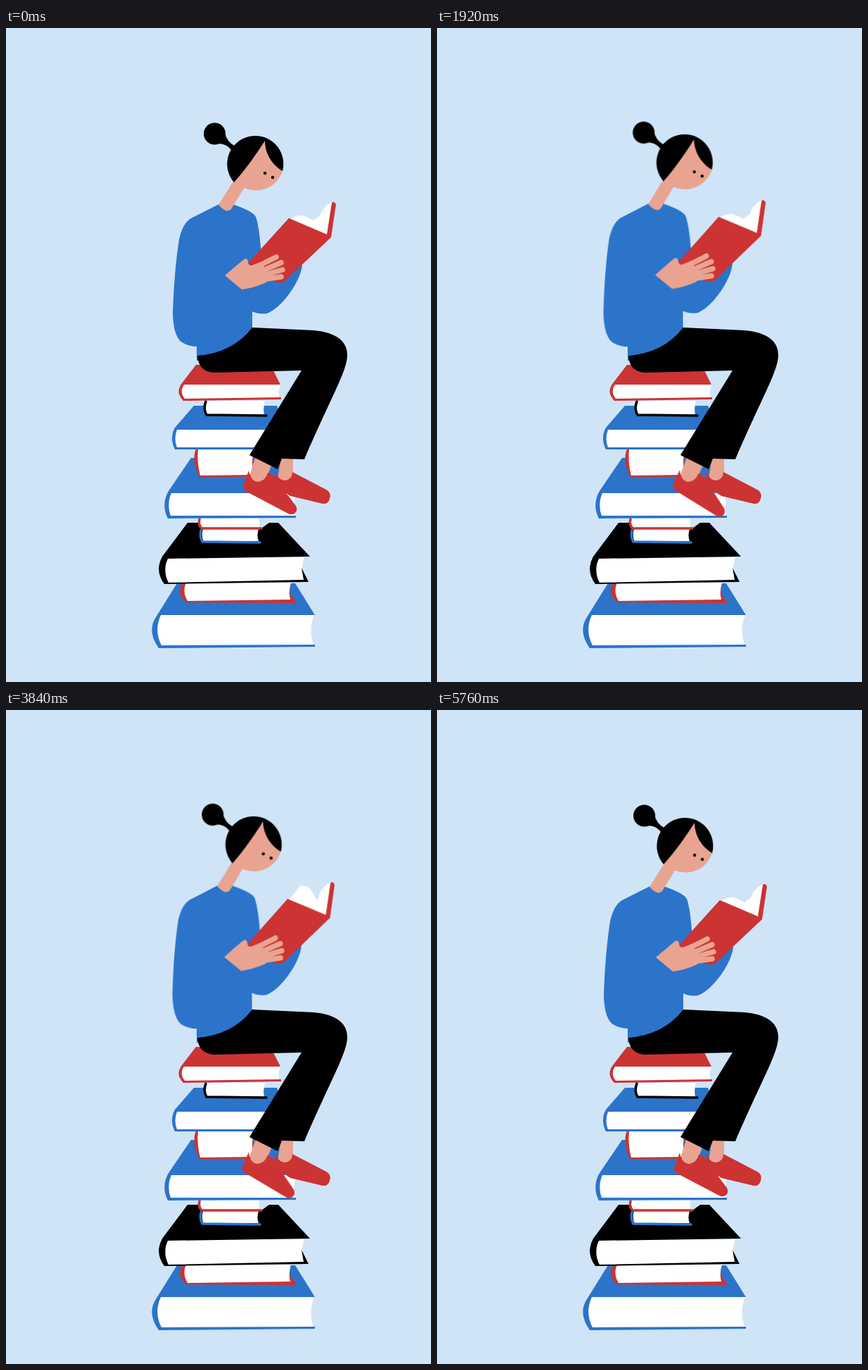
Animation of 604 by 928 pixels, one loop 5840 ms. Source, as an HTML page without scripts:

```html
<!DOCTYPE html>
<html lang="en">
<head>
<meta charset="utf-8">
<title>Reader on a stack of books</title>
<style>
  html, body { margin: 0; width: 100%; height: 100%; overflow: hidden; background: #cfe4f7; }
  svg { display: block; width: 100vw; height: 100vh; }

  .blue { fill: #2b74ca; }
  .red { fill: #cc3333; }
  .skin { fill: #e8a491; }
  .white { fill: #fff; }
  .sky { fill: #cfe4f7; }
  .line { fill: none; stroke-width: 3.5; stroke-linecap: round; stroke-linejoin: round; }
  .line.blue { stroke: #2b74ca; }
  .line.red { stroke: #cc3333; }
  .line.black { stroke: #000; }
  .finger { fill: none; stroke: #e8a491; stroke-width: 7.5; stroke-linecap: round; }
  .leaf { fill: none; stroke: #fff; stroke-width: 3; stroke-linecap: round; }

  [class^="move"] { animation: 5840ms linear infinite; }
  .move-body { animation-name: sway; animation-timing-function: ease-in-out; transform-origin: 300px 465px; }
  .move-head { animation-name: nod; transform-origin: 353px 193px; }
  .move-page { animation-name: page; }
  .move-foot { animation-name: tap; transform-origin: 358px 625px; }
  .move-reading { animation-name: reading; animation-timing-function: step-end; }
  .move-open { animation-name: open; animation-timing-function: step-end; }
  .move-arm { animation-name: swing; transform-origin: 275px 300px; }
  .move-tossed { animation-name: toss; transform-origin: 275px 300px; }
  .move-reach { animation-name: reach; transform-origin: 355px 395px; }
  .move-new { animation-name: drop; }

  @keyframes sway {
    0%, 8% { transform: rotate(0deg) scaleY(1); }
    20.5% { transform: rotate(.8deg) scaleY(.9935); }
    32.9% { transform: rotate(-.5deg) scaleY(1.005); }
    47% { transform: rotate(-1.45deg) scaleY(1.011); }
    54.8% { transform: rotate(-1.25deg) scaleY(1.009); }
    65.8%, 76.7% { transform: rotate(-.5deg) scaleY(1.005); }
    80.8%, 100% { transform: rotate(0deg) scaleY(1); }
  }
  @keyframes nod {
    0%, 76.7% { transform: none; }
    80.8%, 89% { transform: translate(-17px, -9px) rotate(-24deg); }
    95.9% { transform: translate(-4px, -2px) rotate(-4deg); }
    98.6% { transform: translate(-2px, 0) rotate(0deg); }
    100% { transform: none; }
  }
  @keyframes page {
    0%, 48% { d: path("M430 276Q446 270 460 251L463 250Q452 270 455 291Z"); }
    54.8% { d: path("M418 275Q437 264 442 247Q442 262 446 276Q447 288 455 291Z"); }
    65.8% { d: path("M404 271Q412 262 420 251Q434 251 438 262Q446 276 455 291Z"); }
    71%, 94.4% { d: path("M404 271Q412 266 420 266Q432 268 438 276Q446 284 455 291Z"); }
    94.5%, 100% { d: path("M430 276Q446 270 460 251L463 250Q452 270 455 291Z"); }
  }
  @keyframes tap {
    0%, 21% { transform: rotate(0deg); }
    32.9% { transform: rotate(4deg); }
    54.8% { transform: rotate(2deg); }
    65.8% { transform: rotate(3deg); }
    78%, 100% { transform: rotate(0deg); }
  }
  @keyframes reading {
    0% { visibility: visible; }
    78.08% { visibility: hidden; }
    94.52%, 100% { visibility: visible; }
  }
  @keyframes open {
    0% { visibility: hidden; }
    78.08% { visibility: visible; }
    94.52%, 100% { visibility: hidden; }
  }
  @keyframes swing {
    0%, 78.08% { transform: rotate(-22deg); }
    80.82%, 82% { transform: rotate(0deg); }
    84.2% { transform: rotate(28deg); }
    87.6%, 91% { transform: rotate(-12deg); }
    94.5%, 100% { transform: rotate(-25deg); }
  }
  @keyframes toss {
    0%, 78.08% { transform: translate(0, 0) rotate(-22deg); }
    80.82%, 82% { transform: translate(0, 0) rotate(0deg); }
    84.2% { transform: translate(0, 0) rotate(28deg); }
    87%, 100% { transform: translate(-240px, -30px) rotate(40deg); }
  }
  @keyframes reach {
    0%, 78.08% { transform: rotate(8deg) scaleX(.85); }
    80.82%, 83% { transform: rotate(0deg) scaleX(1); }
    87.6%, 93% { transform: rotate(-4deg) scaleX(1.17); }
    94.5%, 100% { transform: rotate(-4deg) scaleX(1); }
  }
  @keyframes drop {
    0%, 87.67% { transform: translate(75px, -400px); }
    92.5% { transform: translate(75px, 0); }
    94.52%, 100% { transform: translate(30px, 0); }
  }
</style>
</head>
<body>
<svg viewBox="0 0 604 928" preserveAspectRatio="none">
  <defs>
    <g id="held-book">
      <path class="white" d="M402 272Q412 265 421 266Q436 270 445 280Q444 256 463 247L466 255L457 294Z"/>
      <path class="red" d="M402 270L456 293L463 248Q466 245 469 250L462 297L395 360Q388 363 380 359L342 336Z"/>
    </g>
  </defs>

  <rect class="sky" width="604" height="928"/>

  <!-- Stack, bottom to top -->
  <g>
    <path class="white" d="M219 833H438Q429 855 438 877H219Q210 855 219 833Z"/>
    <path class="blue" d="M243 788H411L439 833H220Q210 855 221 876L439 875V878L217 880Q200 856 213 836Z"/>
  </g>
  <g>
    <path class="red" d="M252 788H403L404 803L413 816L256 815Q240 800 252 788Z"/>
    <path class="white" d="M256 787H405Q401 800 404 811L258 813Q250 800 256 787Z"/>
  </g>
  <g>
    <path class="white" d="M227 752L424 751Q418 767 424 784L228 788Z"/>
    <path d="M258 702H387L432 750L230 753Q222 770 231 787L423 783L420 766L430 786L225 789Q211 770 222 750Z"/>
  </g>
  <g>
    <path class="white" d="M280 711H359Q356 720 359 728L281 729Q277 720 280 711Z"/>
    <path class="line blue" d="M277 713Q275 722 279 729L361 730"/>
    <path class="white" d="M277 696H360V709H279Q274 703 277 696Z"/>
    <path class="sky" d="M360 696L374 702L363 710H360Z"/>
    <path class="line red" d="M275 697Q273 705 278 710L363 710"/>
  </g>
  <g>
    <path class="white" d="M232 660H412Q408 677 411 693H231Z"/>
    <path class="blue" d="M263 610H392L412 660H235Q228 676 234 692L412 692V695L230 696Q220 676 231 657Z"/>
  </g>
  <g>
    <path class="red" d="M270 597H352V637H275Q263 615 270 597Z"/>
    <path class="white" d="M273 597H352Q348 616 352 634L276 635Q271 616 273 597Z"/>
    <path class="blue" d="M354 604Q348 620 353 638H386L392 604Z"/>
  </g>
  <g>
    <path class="white" d="M240 570H385L370 597H241Z"/>
    <path class="blue" d="M267 536H385L398 570H243Q238 583 243 595H353V598H240Q232 582 240 567Z"/>
  </g>
  <g>
    <path class="white" d="M284 529H368Q365 540 367 549H286Q281 540 284 529Z"/>
    <path class="line black" d="M284 530Q280 540 285 549L370 550"/>
  </g>
  <g>
    <path class="white" d="M250 506H390Q386 516 389 526H250Z"/>
    <path class="red" d="M270 478H376L390 506H253Q246 516 254 526L391 524V527L252 529Q240 517 250 504Z"/>
  </g>

  <!-- Upper body -->
  <g class="move-body">
    <path class="blue" d="M271 472V330L262 271L303 250H322Q351 260 355 268Q361 285 363 330L362 380L350 400V432Q320 465 271 472Z"/>

    <g class="move-open">
      <g class="move-tossed">
        <path class="white" d="M176 651L214 618Q217 632 207 645Q203 680 179 700Z"/>
        <path class="leaf" d="M180 655Q208 642 223 650M180 655Q210 650 222 661M180 655Q206 656 214 673M180 655Q200 668 202 687M180 655Q190 676 195 698"/>
        <path class="red" d="M143 568L191 533L220 617L178 650L179 706Q173 710 167 707L166 650Z"/>
      </g>
      <g class="move-arm">
        <path class="skin" d="M169 498L198 502Q204 516 203 526L197 538L187 546L162 548L152 558Z"/>
        <path class="finger" d="M163 536L157 557M172 545L168 573M179 545L177 576M186 540L183 574"/>
        <path class="blue" d="M303 250Q255 270 236 298Q186 372 178 412L160 497L195 505L211 422Q235 395 262 342Q268 337 272 345L290 320Z"/>
      </g>
      <g class="move-reach">
        <path class="skin" d="M436 357L446 346L476 347L480 360L466 372L442 377Z"/>
        <path class="finger" style="stroke-width:7" d="M449 354L455 332M468 348L503 332M468 354L513 342M468 361L513 355M460 369L491 367"/>
        <path class="blue" d="M362 310L367 372Q368 378 376 376Q405 370 437 355L444 380Q400 411 372 413Q357 413 350 402L340 340Z"/>
      </g>
      <use class="move-new" href="#held-book"/>
    </g>

    <g class="move-reading">
      <path class="blue" d="M303 250L263 270Q251 277 246 300Q239 345 237 405Q238 438 250 446Q260 452 272 452L310 440V260Z"/>
      <path class="blue" d="M349 402Q361 407 371 405C391 398 419 360 421 336L385 345H345Z"/>
      <use href="#held-book"/>
      <path class="move-page white" d="M430 276Q446 270 460 251L463 250Q452 270 455 291Z"/>
      <path class="red" d="M402 270L456 293L460 297L395 360Q388 363 380 359L342 336Z"/>
      <path class="skin" d="M311 351L336 330Q342 324 344 331Q344 337 349 337L362 332L372 347L370 361Q352 369 335 371Z"/>
      <path class="finger" d="M352 341L384 325M358 347L391 333M362 352L393 343M364 357L391 353"/>
    </g>

    <path class="skin" d="M302 251L324 216H345L336 231L320 257Q314 264 302 251Z"/>
    <g class="move-head">
      <circle cx="296.500" cy="150" r="15.500"/>
      <path d="M298 164Q313 163 320 173L326 168Q313 161 311 148Z"/>
      <path class="skin" d="M368 160L393 203A40 40 0 0 1 325 217Z"/>
      <path d="M324 219A40 40 0 1 1 393 203C378 194 368 178 368 160C357 177 342 199 324 219Z"/>
      <circle cx="368" cy="206" r="2.200"/>
      <circle cx="379" cy="212" r="2.200"/>
    </g>
  </g>

  <!-- Legs and feet -->
  <path class="skin" d="M391 608H408V640L397 646L386 640Z"/>
  <path class="red" d="M383 629Q387 642 397 642Q407 640 407 630L455 655Q463 659 460 668Q458 676 450 675L404 664L380 648Z"/>
  <g class="move-foot">
    <path class="skin" d="M354 610L379 616L372 634L366 647H350L347 632Z"/>
    <path class="red" d="M345 628Q348 644 359 644Q369 642 372 631Q379 632 383 640L412 678Q415 684 411 688Q407 692 401 689L340 657Q335 653 338 647Z"/>
  </g>
  <path d="M272 465Q322 461 350 425L437 429C470 432 486 445 485 466C483 490 462 524 424 612L392 611L386 626L346 606L420 486L296 489C280 488 273 479 272 465Z"/>
</svg>
</body>
</html>
```
